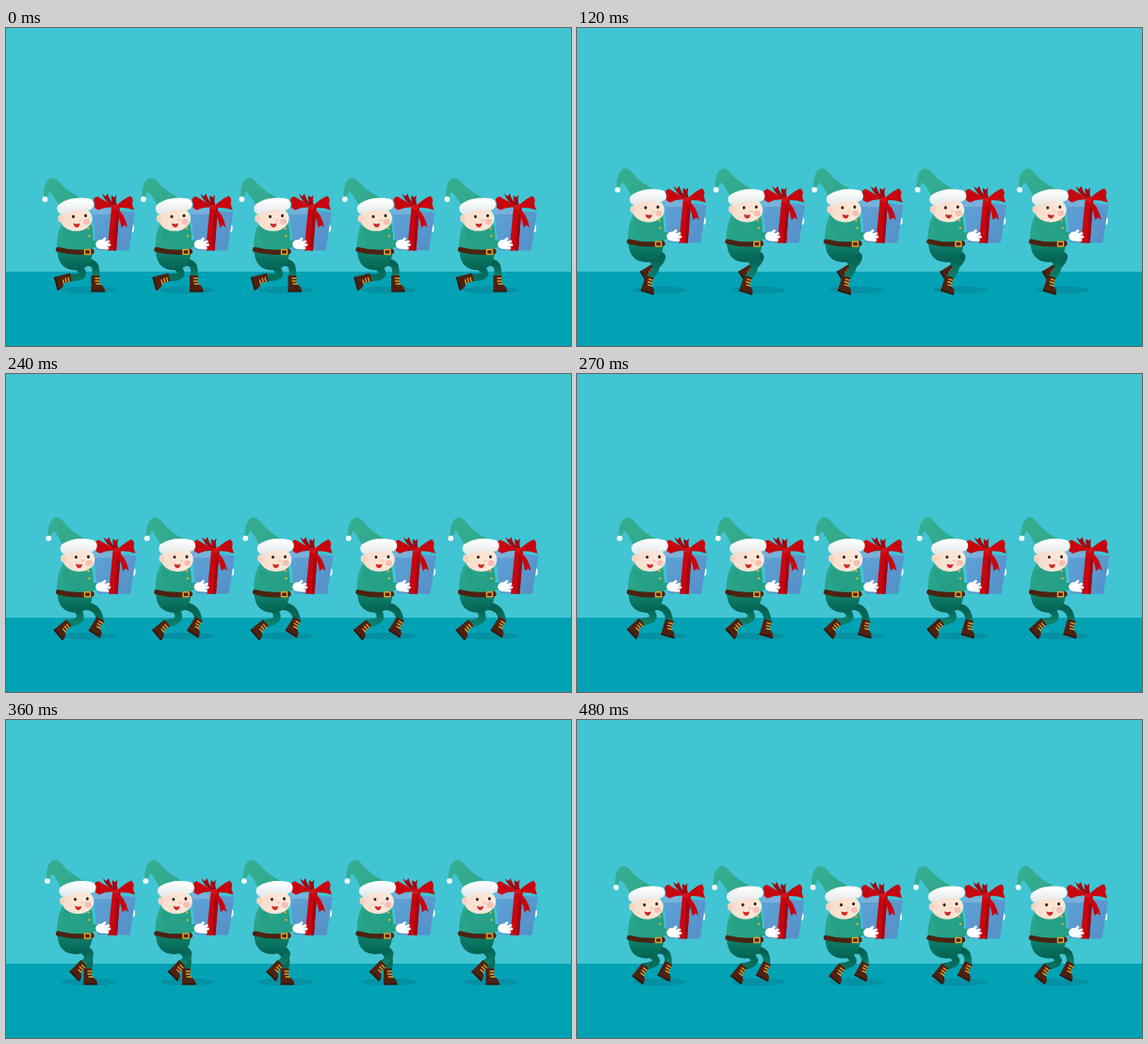
These frames come from a looping animation (600x338 px, 510 ms). An HTML page with a canvas:

```html
<!DOCTYPE html>
<html lang="en">
<head>
<meta charset="utf-8">
<title>Marching elves</title>
<style>
  html, body { margin: 0; width: 100%; height: 100%; overflow: hidden; background: #41c5d3; }
  canvas { display: block; }
</style>
</head>
<body>
<canvas id="stage" width="600" height="338"></canvas>
<script>
const ctx = document.getElementById('stage').getContext('2d');
const LOOP = 510, STEP = 30, KEY = 60;
const ELVES = [0, 104.5, 209, 318.5, 427];

// One key every 60 ms: body lift, then ankle x, ankle y, foot angle in degrees.
const LIFT = [[0], [-4], [-8.5], [-8.5], [-3.7], [-3.7], [-8.5], [-8.5], [-4]];
const FAR_FOOT = [[68, 265, 75], [75, 261, 70], [83, 254, 58], [89, 252, 42], [100, 261, 32],
  [96, 264, 0], [87, 265, 0], [79, 265, 15], [72, 262, 38]];
const NEAR_FOOT = [[95, 264, 0], [82, 265, 0], [77, 265, 18], [74, 264, 45], [66, 265, 50],
  [70, 262, 45], [82, 259, 45], [90, 255, 40], [97, 259, 28]];

function sample(keys, t) {
  const i = Math.floor(t / KEY);
  const f = (t - i * KEY) / Math.min(KEY, LOOP - i * KEY);
  const next = keys[(i + 1) % keys.length];
  return keys[i].map((v, k) => v + (next[k] - v) * f);
}

function gradient(x0, y0, x1, y1, from, to) {
  const g = ctx.createLinearGradient(x0, y0, x1, y1);
  g.addColorStop(0, from);
  g.addColorStop(1, to);
  return g;
}

function fill(path, color) {
  ctx.fillStyle = color;
  ctx.fill(new Path2D(path));
}

function line(path, color, width) {
  ctx.strokeStyle = color;
  ctx.lineWidth = width;
  ctx.stroke(new Path2D(path));
}

function oval(x, y, rx, ry, color) {
  ctx.fillStyle = color;
  ctx.beginPath();
  ctx.ellipse(x, y, rx, ry, 0, 0, Math.PI * 2);
  ctx.fill();
}

function at(x, y, angle, draw) {
  ctx.save();
  ctx.translate(x, y);
  ctx.rotate(angle);
  draw();
  ctx.restore();
}

function boot() {
  fill('M-4.5-1H4.5L4 8Q10 10 10 16H-4.5Z', '#4d2212');
  fill('M-4.5 14.8H10V16.6H-4.5Z', '#35150b');
  line('M0 2H4M0 5H4M1 8H5', '#e0a126', 1.4);
}

function leg(lift, [x, y, angle], color) {
  const hipX = 76 + (x - 80) * 0.2, hipY = 251 + lift, bone = 13.5;
  const dx = x - hipX, dy = y - hipY, d = Math.hypot(dx, dy);
  const bend = 2 * Math.sqrt(Math.max(0, bone * bone - d * d / 4));
  const kneeX = hipX + dx / 2 + dy / d * bend, kneeY = hipY + dy / 2 - dx / d * bend;
  line(`M${hipX} ${hipY}Q${kneeX} ${kneeY} ${x} ${y}`, gradient(0, hipY, 0, y, '#046152', color), 7.6);
  at(x, y, angle * Math.PI / 180, boot);
}

function gift() {
  const red = '#c8060f', darkRed = '#a00812';
  oval(133.5, 213, 2.6, 4.2, '#fff');
  fill('M91 191L137 196L130.5 236.5L96 236Z', gradient(92, 193, 133, 237, '#5ea3d6', '#548fc8'));
  fill('M91 191L114 192L111 198L92 198Z', '#78b1dc');
  fill('M112 191H120.5L117 236.5H107.5Z', red);
  fill('M117 191H120.5L117 236.5H114Z', darkRed);
  fill('M114 189Q105 185 102 176L105.5 179L108 176Q110 184 116 188Z', darkRed);
  fill('M115 189Q111 184 112 178L115 180L117.5 177.500Q116 184 118 188Z', darkRed);
  fill('M116 190L97 179Q93 180 93 183Q95 187 94 191L98 193.5Q107 189 116 191Z', red);
  fill('M116 190Q124 182 132 178.500Q136 181 134 187L136 193.500Q126 190 116 191.500Z', red);
  fill('M115 190Q126 196 129 212L126 209.5L122.5 212Q121 200 114 192Z', red);
  oval(116, 190.5, 3.2, 2.8, '#d8101a');
}

function body() {
  fill('M54.5 236Q55 257 74 257.5Q91 257 92 237Z', gradient(0, 238, 0, 258, '#0d806a', '#046152'));
  fill('M62 204Q54 213 54 235Q74 242 92 236.5Q94 220 90 205Z',
    gradient(56, 205, 92, 240, '#2ea98d', '#209b82'));
  line('M55.5 235.5Q72 240 91 237.5', '#4d2212', 5.4);
  ctx.strokeStyle = '#e0a52c';
  ctx.lineWidth = 1.5;
  ctx.strokeRect(83.5, 235.5, 6, 5);
  oval(87.5, 213, 1.2, 1.2, '#e0aa35');
  oval(88.5, 221, 1.2, 1.2, '#e0aa35');
}

function arm() {
  line('M64 215Q66 229 80 230L94 229.5', '#25a086', 8);
  oval(101, 230, 5.8, 5, '#fff');
  line('M102 227L105 224M103 229L109 227M103 231L110 230.5M102 233.5L108 234', '#fff', 2.8);
}

function head() {
  oval(74.5, 202.5, 17, 13.3, gradient(57, 200, 92, 206, '#f8dcc9', '#fdeadd'));
  oval(58, 202.5, 2.8, 4, '#f6d3bf');
  oval(85.5, 206, 3.6, 3.2, '#f8bfb4');
  oval(71.5, 200.5, 1.5, 1.7, '#332019');
  oval(84.5, 199.5, 1.5, 1.7, '#332019');
  oval(79, 204, 2, 1.5, '#f6cfba');
  fill('M71.5 207.5Q75 209 78.5 207.500Q78 212 75 212Q72 211.500 71.5 207.5Z', '#cf2a25');
  fill('M57 190Q50 176 46 174L42.5 181L40 180Q40 165 45 161Q49 157 55 162Q66 176 88 184Z',
    gradient(45, 160, 75, 190, '#36ae92', '#30a78b'));
  oval(41.4, 182, 2.9, 2.9, '#f2fafa');
  line('M60.5 192Q71 185 87 187.5', gradient(0, 182, 0, 199, '#ffffff', '#dfe5e6'), 12.5);
}

function elf(t) {
  const [lift] = sample(LIFT, t);
  const lean = Math.sin(Math.PI * t / LOOP) ** 2;
  oval(88, 278.5, 29, 3.8, '#0491a3');
  leg(lift, sample(FAR_FOOT, t), '#08705d');
  leg(lift, sample(NEAR_FOOT, t), '#0d806a');
  at(0, lift, 0, () => {
    body();
    at(1.5 * lean, lean, 0, gift);
    arm();
    at(75 + 2.5 * lean, 210 - 2 * lean, 0.05 * lean, () => {
      ctx.translate(-75, -210);
      head();
    });
  });
}

function render() {
  const elapsed = (performance.now() - start) % LOOP;
  const t = Math.floor(elapsed / STEP) * STEP;
  ctx.fillStyle = '#41c5d3';
  ctx.fillRect(0, 0, 600, 259);
  ctx.fillStyle = '#00a2b4';
  ctx.fillRect(0, 259, 600, 79);
  for (const x of ELVES) at(x, 0, 0, () => elf(t));
  requestAnimationFrame(render);
}

ctx.lineJoin = 'round';
ctx.lineCap = 'round';
const start = performance.now();
render();
</script>
</body>
</html>
```
